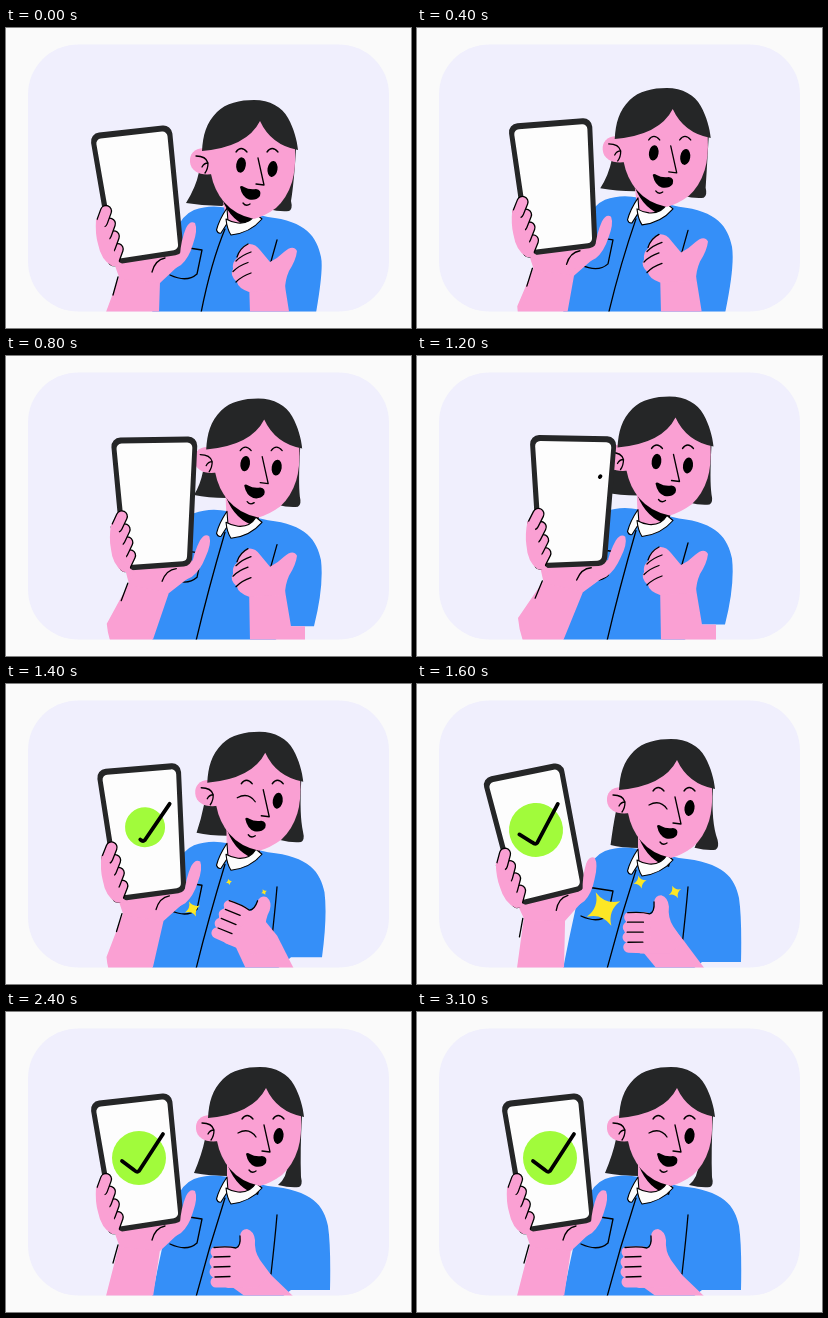
An HTML page with a canvas that plays this animation: 405 by 300 pixels, repeating every 3.2 s.

```html
<!DOCTYPE html>
<html lang="en">
<head>
<meta charset="utf-8">
<title>Thumbs up</title>
<style>
html, body { margin: 0; width: 100%; height: 100%; overflow: hidden; background: #fafafa; }
canvas { display: block; width: 405px; height: 300px; }
</style>
</head>
<body>
<canvas id="stage"></canvas>
<script>
const LOOP = 3200, STEP = 100, SWITCH = 1400;
const SKIN = '#faa0d3', BLUE = '#358ff8', HAIR = '#252627', INK = '#000', PAPER = '#fdfdfd';

const canvas = document.getElementById('stage');
const ctx = canvas.getContext('2d');
const ratio = window.devicePixelRatio || 1;
canvas.width = 405 * ratio;
canvas.height = 300 * ratio;

let now = 0;

function ease(from, to) {
  const u = Math.min(1, Math.max(0, (now - from) / (to - from)));
  return u * u * (3 - 2 * u);
}

function pulse(from, to) {
  return now <= from || now >= to ? 0 : Math.sin(Math.PI * (now - from) / (to - from));
}

// The figure rises from a low pose, then drops into its resting pose.
function pose(low, high, rest, riseEnd = 950) {
  const risen = low + (high - low) * ease(0, riseEnd);
  return risen + (rest - risen) * ease(1200, 1600);
}

const swing = () => pulse(1300, 2100);

function fill(d, color) {
  ctx.fillStyle = color;
  ctx.fill(new Path2D(d));
}

function line(d, width = 1.3, color = INK) {
  ctx.strokeStyle = color;
  ctx.lineWidth = width;
  ctx.stroke(new Path2D(d));
}

function ellipse(x, y, rx, ry, angle, color) {
  ctx.fillStyle = color;
  ctx.beginPath();
  ctx.ellipse(x, y, rx, ry, angle, 0, Math.PI * 2);
  ctx.fill();
}

function within(dx, dy, degrees, px, py, draw) {
  ctx.save();
  ctx.translate(px + dx, py + dy);
  ctx.rotate(degrees * Math.PI / 180);
  ctx.translate(-px, -py);
  draw();
  ctx.restore();
}

function roundQuad(points, radius, color) {
  const [a, b] = [points[3], points[0]];
  ctx.fillStyle = color;
  ctx.beginPath();
  ctx.moveTo((a[0] + b[0]) / 2, (a[1] + b[1]) / 2);
  points.forEach((p, i) => ctx.arcTo(...p, ...points[(i + 1) % 4], radius));
  ctx.closePath();
  ctx.fill();
}

function backHair() {
  const s = swing();
  const lx = pose(186, 190, 188) + 6 * s, ly = pose(158, 151, 161);
  const rx = pose(292, 297, 296) + 6 * s, ry = pose(166, 163, 175) - 10 * s;
  fill(`M212 96L199 127Q196 142 ${lx} ${ly}Q204 ${ly + 3} 222 ${ly + 3}L240 150L282 150
    Q281 ${ry - 9} ${rx - 24} ${ry - 2}Q${rx - 12} ${ry + 1} ${rx - 3} ${ry}Q${rx + 1} ${ry - 2} ${rx - 1} ${ry - 10}Q294 138 296 104Z`, HAIR);
}

function face(open) {
  fill('M212 105C198 100 189 107 190 117C191 127 201 131 213 129Z', SKIN);
  fill('M207 105L258 70L295 104Q296 124 292 137Q287 153 276 163Q265 171 254 174Q235 170 224 157Q214 145 211 129Z', SKIN);
  fill('M202 106C203 90 206 78 217 67C226 58 240 55 254 55C270 55 282 62 288 73C294 84 297 95 298 105Q271 100 260 76Q247 102 202 106Z', HAIR);
  line('M196 111Q206 111 208 118Q208 124 205 128M208 118Q204 118 202 122');
  line('M236 107Q241 100 247 107M267 107Q272 100 278 107');
  line('M258 113L264 140L256 139');
  if (open) ellipse(241, 120, 4.8, 7.7, 0.15, INK);
  else line('M232 121Q243 115 250 125');
  ellipse(272.5, 124, 5, 8, 0.15, INK);
  fill('M240 142Q241 140 244 142Q249 145 256 144Q262 145 260 151Q256 156 249 154.500Q242 152 240 142Z', INK);
  line('M243 158Q246 162 250 159');
}

function shirt(rise, hem) {
  const side = pose(316, 316, 323);
  const at = (x, y) => `${x} ${y + rise}`;
  fill(`M${at(222, 165)}Q${at(204, 161)} ${at(188, 167)}Q${at(176, 172)} ${at(170, 188)}
    L160 218L152 255L146 285L${hem - 2} 285L285 ${hem}L${side - 8 + ease(1200, 1600) * 9} ${hem}
    Q${side + 2} ${235 + rise / 2} ${at(side - 1, 214)}C${at(side - 5, 194)} ${at(side - 16, 178)} ${at(262, 174)}Z`, BLUE);
  line(`M${at(219, 186)}Q${203 + rise / 8} 235 ${190 + Math.max(0, rise / 3)} 285`);
  line(`M${at(170, 203)}L${at(196, 207)}L${at(191, 231)}Q${at(181, 240)} ${at(164, 232)}`);
}

function neck(hx, hy, rise) {
  const at = (x, y) => `${x + hx} ${y + hy}`;
  fill(`M${at(221, 145)}L221 ${182 + rise}L240 ${187 + rise}L251 ${174 + rise}L${at(265, 158)}Z`, SKIN);
  fill(`M${at(222, 154)}Q${at(236, 170)} ${at(255, 173)}L${at(252, 183)}Q${at(231, 177)} ${at(222, 154)}Z`, INK);
}

function collar() {
  for (const d of ['M221 165Q213 177 210.500 187Q212 191 215 190L222 179Z',
                   'M220 176Q221 186 225 192Q244 190 256 176L250 171Q244 181 232 180Q225 179 220 176Z']) {
    fill(d, PAPER);
    line(d, 1.1);
  }
}

// The raised phone tips forward, so its top looks wider than its foot.
function phone() {
  const tip = pose(0, 1, 0);
  roundQuad([[83.5 - 2 * tip, 89.5], [165.5 + 3 * tip, 80.5], [178 - 4 * tip, 210], [106, 221]], 9, HAIR);
  roundQuad([[89.5 - 2 * tip, 95], [161 + 3 * tip, 87], [172.5 - 4 * tip, 205.5], [110.5, 215]], 5, PAPER);
  if (now < 1200) return;
  const grown = ease(1200, 1500), radius = 27 * grown;
  ellipse(133, 146, radius, radius, 0, '#a1fb3b');
  ctx.save();
  ctx.setLineDash([1 + 65 * grown, 100]);
  line('M157 122L133 159Q131 161 128 158L116 149', 3.8);
  ctx.restore();
}

function holdingFingers() {
  for (let i = 3; i >= 0; i--) {
    const x = 96 + 3.9 * i, y = 178 + 12.7 * i;
    const d = `M${x} ${y}L${x + 4} ${y - 11}`;
    line(d, 12.3);
    line(d, 9.7, SKIN);
  }
  fill('M90 175Q89 190 92 200Q95 216 106 222L120 222L113 218L109 209L105 200L101 187L97 180Z', SKIN);
}

function phoneHand() {
  const s = swing(), bend = pose(0, 1, 0, 1200);
  const dx = pose(0, 16.5, 0, 1200) - 9.5 * s, dy = pose(16, -4.5, 0) - s;
  const degrees = pose(0, 7, 0, 1200) - 5.5 * s;
  const a = degrees * Math.PI / 180, c = Math.cos(a), n = Math.sin(a);
  const at = (x, y) => `${140 + dx + (x - 140) * c - (y - 205) * n} ${205 + dy + (x - 140) * n + (y - 205) * c}`;
  fill(`M${at(108, 219)}L${at(113, 233)}L${100 + bend} ${284 - 22 * bend}
    Q${100 + bend * 2} ${284 - 10 * bend} ${99 + 7 * bend} 285L${pose(153, 146, 147)} 285
    L${at(154, 238)}L${at(165, 228)}L${at(174, 212)}Z`, SKIN);
  within(dx, dy, degrees, 140, 205, () => {
    fill('M97 180L104 212Q108 222 116 224L113 235L154 239L172 222L176 205Z', SKIN);
    phone();
    holdingFingers();
    fill('M146 227Q150 216 160 214L174 211Q175 196 180 184Q184 176 189 179Q192 186 187 200Q183 214 175 221Q167 225 160 231L146 234Z', SKIN);
    line('M146 228Q149 216 159 214');
    line('M112 233L107 251');
  });
}

function sideFist(hem) {
  const dy = pose(24, -1, 10), turn = -40 * ease(1200, 1500);
  line(`M271 ${188 + dy}L264 ${213 + dy}`);
  fill(`M243 ${228 + dy}L244 285L299 285L299 ${hem}L285 ${hem}L279 ${234 + dy}Z`, SKIN);
  within(0, dy, turn, 258, 220, () => {
    fill(`M242 192Q249 191 254 198L264 210Q272 206 278 200Q287 192 291 199Q290 208 283 219Q279 228 279 238
      L243 240Q232 236 231 230Q223 223 227 217Q226 210 231 206Q233 195 242 192Z`, SKIN);
    for (let i = 0; i < 3; i++) {
      const x = 230 - (i % 2) * 3, y = 209 + 10.5 * i;
      line(`M${x} ${y}Q${x + 6} ${y - 6} ${x + 15} ${y - 9}`);
    }
    line('M231 205Q234 196 242 192');
  });
}

function thumbUp() {
  const s = swing(), k = 1 - ease(1300, 1650);
  const dx = 8 * k + 2 * s, dy = -10 * k - 6 * s;
  line('M271 203Q269 227 265 262');
  fill(`M${222 + dx} ${272 + dy}L240 285L288 285L${264 + dx} ${262 + dy}L${246 + dx} ${240 + dy}Z`, SKIN);
  within(dx, dy, 30 * k, 232, 250, () => {
    fill('M210 235L232 236Q235 232 234 224Q235 217 241 217Q248 219 249 228Q248 239 254 248L265 263L252 275L222 276L212 272L204 251Z', SKIN);
    for (let i = 0; i < 4; i++) {
      const y = 240 + 10 * i, x = 209 + (i % 3 ? 0 : 1);
      line(`M${x} ${y}L226 ${y}`, 11, SKIN);
      if (i) line(`M${x - 1} ${y - 5}L224 ${y - 5.5}`);
    }
    line('M208 235.500Q222 234 230 236Q235 234 234 224');
  });
}

function spark(x, y, size, degrees) {
  within(x, y, degrees, 0, 0, () => {
    ctx.scale(size, size);
    fill('M0 -1Q.17 -.17 1 0Q.17 .17 0 1Q-.17 .17 -1 0Q-.17 -.17 0 -1Z', '#fde725');
  });
}

function draw() {
  ctx.setTransform(ratio, 0, 0, ratio, 0, 0);
  ctx.lineCap = ctx.lineJoin = 'round';
  ctx.fillStyle = '#fafafa';
  ctx.fillRect(0, 0, 405, 300);
  ctx.save();
  ctx.beginPath();
  ctx.roundRect(22, 16.5, 361, 267, 50);
  ctx.fillStyle = '#f0effd';
  ctx.fill();
  // The figure ends on the card's lower edge.
  ctx.clip();

  const hx = pose(-6, -1.5, 0), hy = pose(17, -14.5, 0);
  const rise = pose(15, -11.5, 0), hem = pose(296, 268.5, 278);
  const open = now < SWITCH;
  within(hx, hy, 0, 0, 0, backHair);
  shirt(rise, hem);
  neck(hx, hy, rise);
  within(0, rise, 0, 0, 0, collar);
  within(hx, hy, 0, 0, 0, () => face(open));
  phoneHand();
  if (open) sideFist(hem);
  else thumbUp();

  const size = pulse(1300, 2000);
  if (size) {
    spark(186.5, 225, 19 * size, -25);
    spark(223, 198, 7 * size, -15);
    spark(258, 208, 7 * size, -25);
  }
  ctx.restore();
}

function play() {
  now = Math.floor(performance.now() % LOOP / STEP) * STEP;
  draw();
  requestAnimationFrame(play);
}
play();
</script>
</body>
</html>
```
